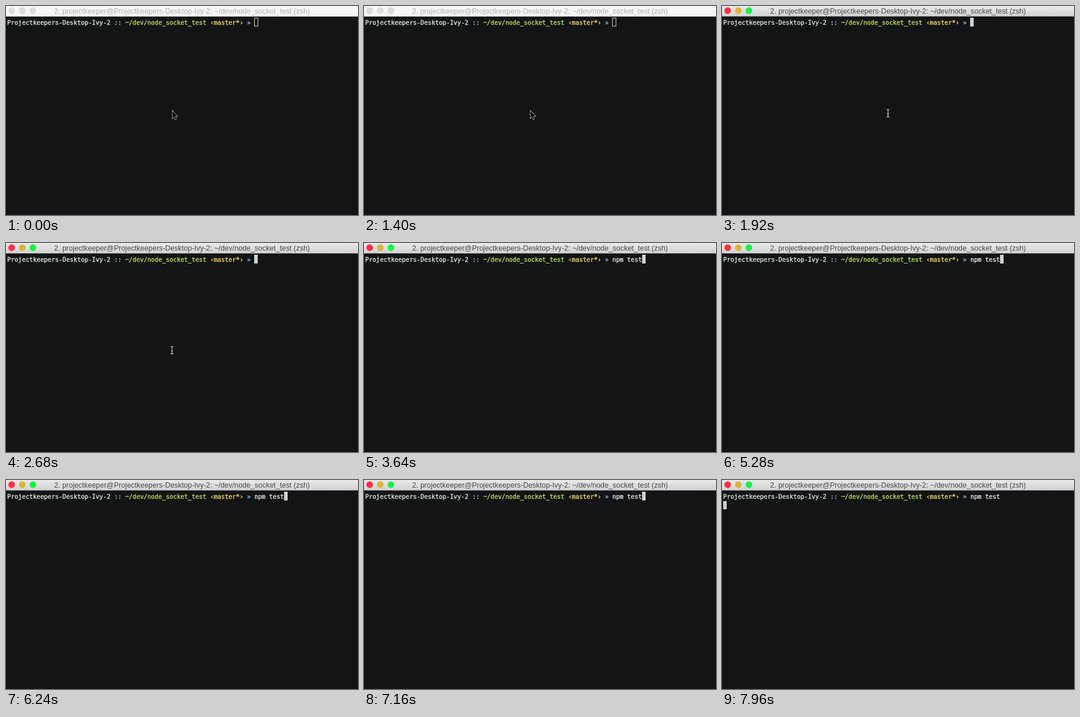
An HTML page with a canvas that plays this animation: 600 by 357 pixels, repeating every 8000 ms.

```html
<!DOCTYPE html>
<html lang="en">
<head>
<meta charset="utf-8">
<title>Terminal</title>
<style>
  html, body { margin: 0; width: 100%; height: 100%; overflow: hidden; background: #121415; }
  canvas { display: block; }
</style>
</head>
<body>
<canvas id="stage" width="600" height="357"></canvas>
<script>
const ctx = document.getElementById('stage').getContext('2d');
const LOOP = 8000;
const CLICK = 1640, FOCUS = 1760, TYPE = 3240, KEY = 45, ENTER = 7760;
const CELL = 6.29, LEFT = 2, BASE = 31.5;
const MONO = '10.45px "DejaVu Sans Mono", monospace';
const COMMAND = 'npm test';
const TITLE = '2. projectkeeper@Projectkeepers-Desktop-Ivy-2: ~/dev/node_socket_test (zsh)';
const PROMPT = [
  ['Projectkeepers-Desktop-Ivy-2 ', '#d3dfdc'],
  [':: ', '#8ecbe2'],
  ['~/dev/node_socket_test ', '#b5d85c'],
  ['‹master*› ', '#f0d264'],
  ['» ', '#79b4d2']
];
const PROMPT_LENGTH = PROMPT.reduce((sum, [text]) => sum + text.length, 0);

const arrow = new Path2D('M283.5 179 V191.6 L286.3 188.9 L288.3 193.6 L290.3 192.7 L288.4 188.2 H292.2 Z');
const beam = new Path2D('M280.5 176.5 Q283 176.5 283 178.5 Q283 176.5 285.5 176.5 ' +
  'M283 178 V188 M280.5 189.5 Q283 189.5 283 187.5 Q283 189.5 285.5 189.5 M281.5 184.5 H284.5');

const columnX = column => LEFT + column * CELL;

function drawTitleBar(active) {
  const fill = ctx.createLinearGradient(0, 0, 0, 18);
  fill.addColorStop(0, active ? '#e9e9e9' : '#f7f7f7');
  fill.addColorStop(1, active ? '#d1d1d1' : '#f4f4f4');
  ctx.fillStyle = fill;
  ctx.fillRect(0, 0, 600, 18);
  if (active) {
    ctx.fillStyle = '#a5a5a5';
    ctx.fillRect(0, 17, 600, 1);
  }

  const colours = active ? ['#fb3046', '#d9b637', '#16f14a'] : ['#dcdcdc', '#dcdcdc', '#dcdcdc'];
  colours.forEach((colour, i) => {
    ctx.fillStyle = colour;
    ctx.beginPath();
    ctx.arc(9.7 + i * 18.1, 8, 5.7, 0, Math.PI * 2);
    ctx.fill();
  });

  ctx.font = '12.46px "Liberation Sans", Arial, sans-serif';
  ctx.textAlign = 'center';
  ctx.fillStyle = active ? '#4a4a4a' : '#b3b3b3';
  ctx.fillText(TITLE, 300, 12.8);
  ctx.textAlign = 'left';
}

// A thin outline gives the half-bold weight of terminal text.
function drawText(text, column, colour) {
  ctx.font = MONO;
  ctx.fillStyle = ctx.strokeStyle = colour;
  ctx.lineWidth = 0.4;
  ctx.fillText(text, columnX(column), BASE);
  ctx.strokeText(text, columnX(column), BASE);
}

function drawLine(typed) {
  let column = 0;
  for (const [text, colour] of PROMPT) {
    drawText(text, column, colour);
    column += text.length;
  }
  drawText(COMMAND.slice(0, typed), column, '#dce3e1');
}

function drawCaret(column, row, active) {
  const x = Math.round(columnX(column)), y = 20 + row * 16;
  if (active) {
    ctx.fillStyle = '#d0d2d1';
    ctx.fillRect(x, y, 6, row ? 14 : 15);
  } else {
    ctx.strokeStyle = '#c9cbca';
    ctx.lineWidth = 1;
    ctx.strokeRect(x + 0.5, y + 0.5, 6, 14);
  }
}

function drawArrow() {
  ctx.fillStyle = '#050505';
  ctx.strokeStyle = '#f4f4f4';
  ctx.lineWidth = 1.1;
  ctx.stroke(arrow);
  ctx.fill(arrow);
}

function drawBeam() {
  ctx.strokeStyle = '#d8d8d8';
  ctx.lineWidth = 1.1;
  ctx.stroke(beam);
}

function draw(t) {
  const active = t >= FOCUS;
  const typed = t < TYPE ? 0 : Math.min(COMMAND.length, 1 + Math.floor((t - TYPE) / KEY));
  ctx.fillStyle = '#121415';
  ctx.fillRect(0, 0, 600, 357);
  drawTitleBar(active);
  drawLine(typed);
  if (t < ENTER) drawCaret(PROMPT_LENGTH + typed, 0, active);
  else drawCaret(0, 1, true);
  if (t < CLICK) drawArrow();
  else if (!typed) drawBeam();
}

const start = performance.now();
function tick() {
  draw((performance.now() - start) % LOOP);
  requestAnimationFrame(tick);
}
tick();
</script>
</body>
</html>
```
